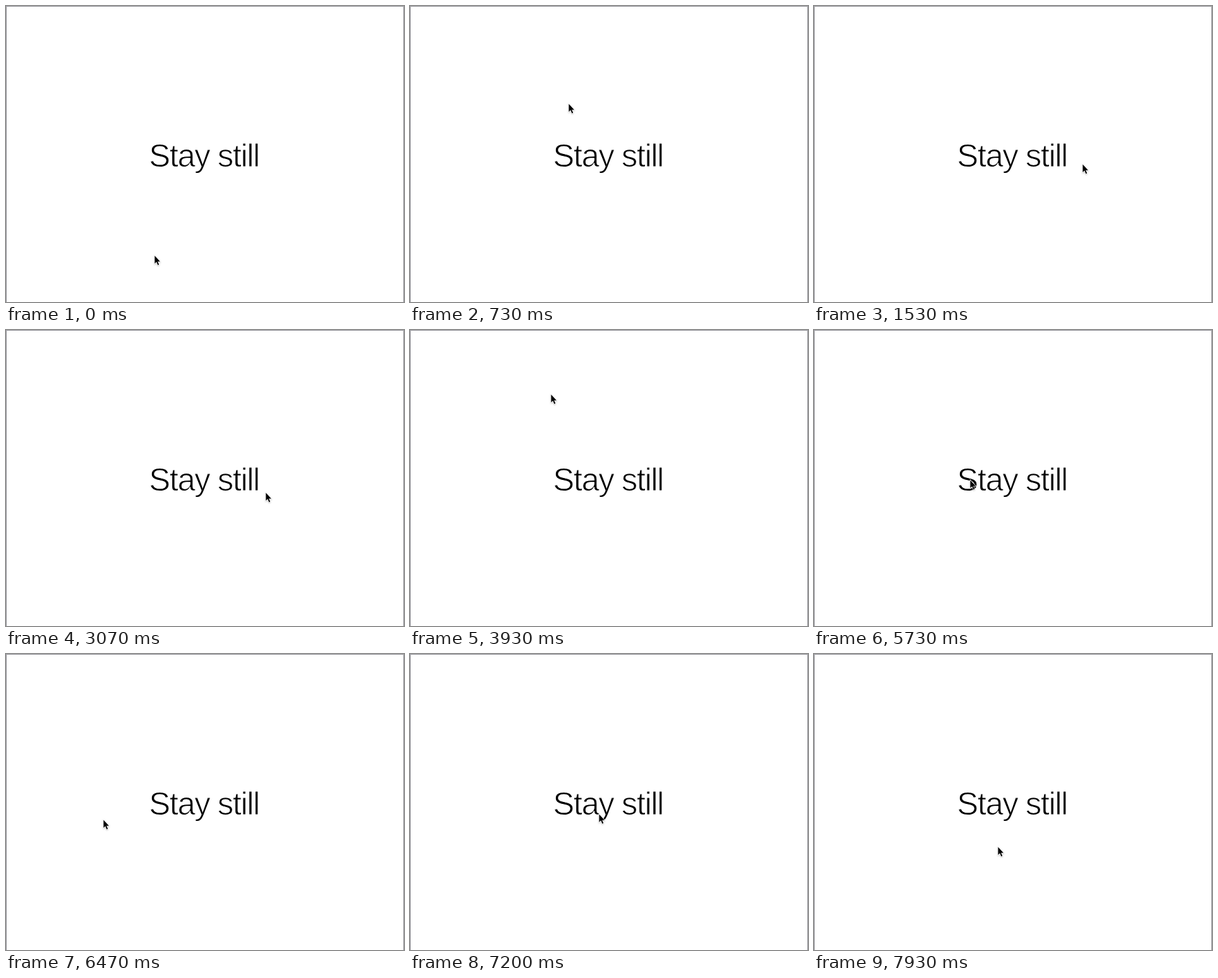
Recreate the animation shown at these times as an HTML page. Size 630 px wide and 470 px high, loop 8 s.

```html
<!DOCTYPE html>
<html lang="en">
<head>
<meta charset="utf-8">
<title>Stay still</title>
<style>
  html, body { margin: 0; width: 100%; height: 100%; overflow: hidden; background: #fff; }
  svg { display: block; }
  /* A white stroke over the fill thins the letters to a light weight. */
  text {
    font: 51px "Liberation Sans", Arial, sans-serif;
    letter-spacing: -.03em;
    text-rendering: geometricPrecision;
    stroke: #fff;
    stroke-width: 1.1px;
  }
  #cursor { filter: drop-shadow(0 1.2px 1px rgba(0, 0, 0, .25)); }
</style>
</head>
<body>
<svg width="630" height="470" viewBox="0 0 630 470">
  <path d="M.5 470V.5H629.5V470" fill="none" stroke="#8a8a90"/>
  <text x="226.3" y="254.8">Stay still</text>
  <g id="cursor">
    <path d="M.4 1.4V14L3.2 11.3L5.4 16.4L7.2 15.6L5.1 10.7H8.9Z" stroke="#fff" stroke-width="1.4" paint-order="stroke"/>
  </g>
</svg>
<script>
const LOOP = 8000;
const FPS = 15;

// Where the pointer turns or rests: [tick, x, y]
const turns = [
  [0, 235, 395], [5, 115, 260], [10, 230, 149], [14, 364, 183], [19, 288, 215],
  [23, 425, 250], [26, 425, 250], [30, 583, 180], [38, 112, 50],
  [46, 411, 257], [52, 117, 381], [59, 223, 101], [63, 150, 212], [66, 150, 212],
  [70, 29, 300], [75, 435, 423], [79, 537, 384], [87, 234, 230], [92, 300, 240],
  [97, 154, 262], [105, 396, 274], [112, 149, 220], [117, 416, 230], [119, 291, 305]
];

const ease = u => u * u * (3 - 2 * u);

function pointerAt(tick) {
  const next = Math.max(1, turns.findIndex(turn => turn[0] >= tick));
  const [t0, x0, y0] = turns[next - 1], [t1, x1, y1] = turns[next];
  const k = ease((tick - t0) / (t1 - t0));
  return [x0 + (x1 - x0) * k, y0 + (y1 - y0) * k].map(Math.round);
}

const cursor = document.getElementById("cursor");
const start = performance.now();

function draw(now) {
  const time = Math.max(0, now - start) % LOOP;
  const tick = Math.min(119, Math.floor((time + 4) * FPS / 1000));
  cursor.setAttribute("transform", `translate(${pointerAt(tick)})`);
  requestAnimationFrame(draw);
}
draw(start);
</script>
</body>
</html>
```
